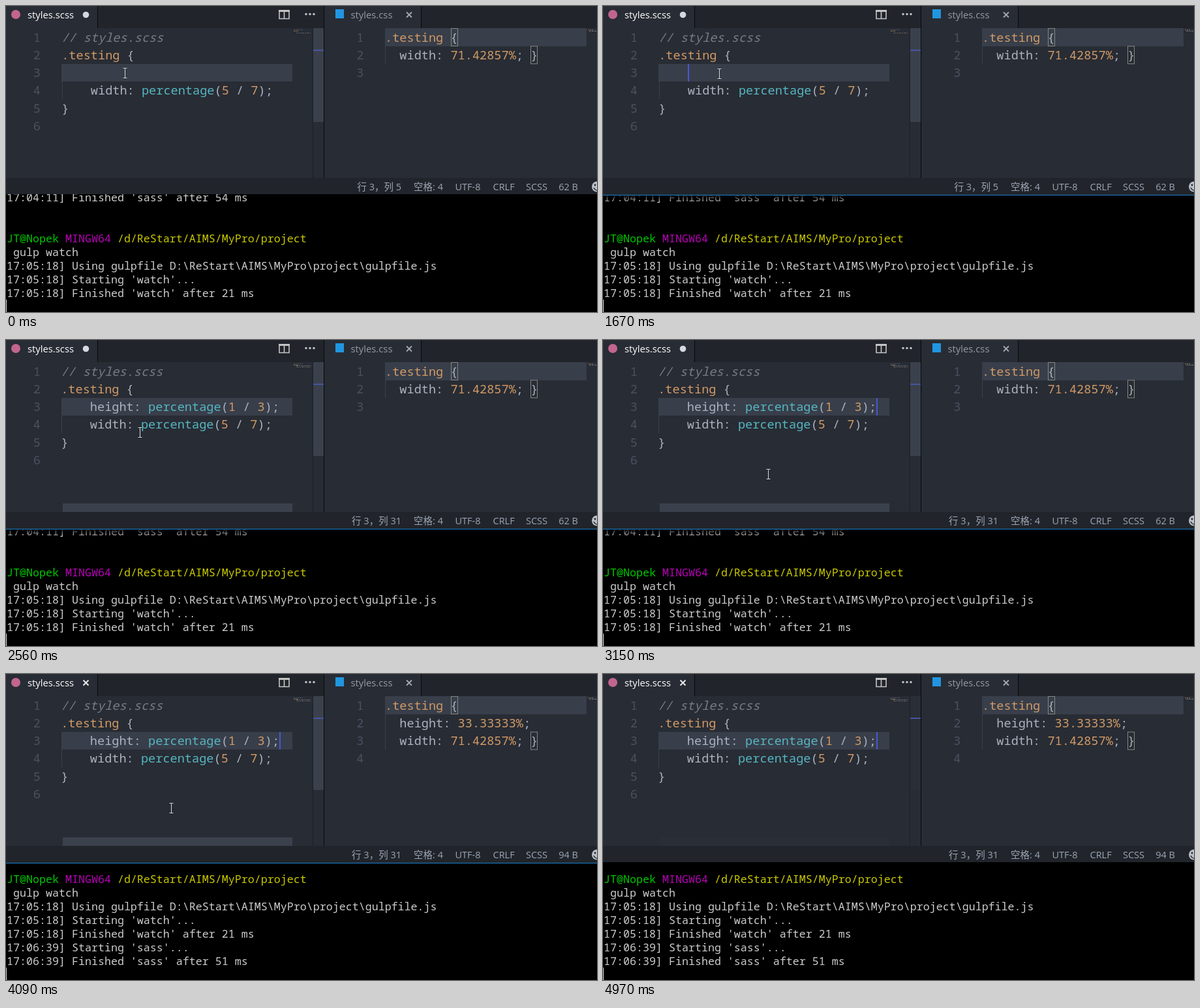
Write an HTML page that moves like this. It is 906 by 470 pixels and loops after 5070 ms.

```html
<!DOCTYPE html>
<html lang="en">
<head>
<meta charset="utf-8">
<title>SCSS watch</title>
<style>
html, body { margin: 0; width: 100%; height: 100%; overflow: hidden; background: #000; }
svg { display: block; width: 906px; height: 470px; }
text { white-space: pre; }
.code { font: 18.6px "Noto Sans Mono", monospace; }
.term { font: 16.67px "Noto Sans Mono", monospace; }
.ui { font: 14.8px "Open Sans", sans-serif; }
.status { font: 14.5px "Open Sans", "Noto Sans CJK SC", "Noto Sans CJK", sans-serif; }
</style>
</head>
<body>
<svg id="stage" viewBox="0 0 906 470"></svg>
<script>
const LOOP = 5070;
const stage = document.getElementById('stage');
const C = {
  bg: '#282c34', bar: '#21252b', edge: '#07080a', line: '#383e4a', gutter: '#495162',
  text: '#abb2bf', num: '#d19a66', fn: '#56b6c2', comment: '#757c88', status: '#9da5b4',
  caret: '#4757d2', slider: '#3b414c', guide: '#3b4048', term: '#cccccc'
};

function add(parent, tag, attrs = {}, content = '') {
  const el = document.createElementNS('http://www.w3.org/2000/svg', tag);
  for (const key in attrs) el.setAttribute(key, attrs[key]);
  el.textContent = content;
  parent.append(el);
  return el;
}
const group = (parent, attrs) => add(parent, 'g', attrs);
const rect = (parent, x, y, width, height, fill) => add(parent, 'rect', { x, y, width, height, fill });
const path = (parent, d, stroke, width = 1) =>
  add(parent, 'path', { d, stroke, fill: 'none', 'stroke-width': width });
const label = (parent, cls, x, y, fill, str, anchor = 'start') =>
  add(parent, 'text', { class: cls, x, y, fill, 'text-anchor': anchor }, str);

// parts alternate: colour, text, colour, text, ...
function rich(parent, cls, x, y, parts) {
  const el = add(parent, 'text', { class: cls, x, y });
  for (let i = 0; i < parts.length; i += 2) add(el, 'tspan', { fill: parts[i] }, parts[i + 1]);
  return el;
}
const rowY = n => 54.5 + 27.3 * (n - 1);
const codeRow = (parent, x, n, ...parts) => rich(parent, 'code', x, rowY(n), parts);
const lineNumber = (parent, x, n) => label(parent, 'code', x, rowY(n), C.gutter, n, 'end');
const show = (el, on) => el.setAttribute('display', on ? 'inline' : 'none');
const cross = (parent, x, color, width) =>
  path(parent, `M${x - 4} 9.5l8 8m0-8l-8 8`, color, width);

// Editor background and tabs
rect(stage, 0, 0, 906, 264, C.bg);
rect(stage, 141, 0, 346, 34, C.bar);
rect(stage, 637, 0, 269, 34, C.bar);
rect(stage, 140, 0, 1, 34, C.edge);
rect(stage, 636, 0, 1, 34, C.edge);

add(stage, 'circle', { cx: 15, cy: 13, r: 7, fill: '#c2658f' });
label(stage, 'ui', 33, 19, '#ffffff', 'styles.scss');
const dirtyDot = add(stage, 'circle', { cx: 122.5, cy: 13.5, r: 4.8, fill: '#d5d8dc' });
const closeMark = cross(stage, 122.5, '#e8e8e8', 2);
path(stage, 'M419 7.5h15v12h-15zM426.5 7v12', '#c5c5c5', 1.6);
rect(stage, 418, 6, 17, 3, '#c5c5c5');
for (const x of [460, 466, 472]) add(stage, 'circle', { cx: x, cy: 12.5, r: 1.7, fill: '#c5c5c5' });
rect(stage, 505, 5, 13, 14, '#2196e0');
label(stage, 'ui', 528.5, 19, '#959ba5', 'styles.css');
cross(stage, 618, '#a4a8ae', 1.8);

// Left pane
for (let n = 1; n <= 6; n++) lineNumber(stage, 53, n);
rect(stage, 85, 89, 354, 27, C.line);
const left = group(stage);
const codeX = 85.2;
rect(left, 86, 89, 1, 54, C.guide);
add(codeRow(left, codeX, 1), 'tspan', { fill: C.comment, 'font-style': 'italic' }, '// styles.scss');
codeRow(left, codeX, 2, C.num, '.testing', C.text, ' {');
const ratio = (n, prop, a, b) => codeRow(left, codeX, n,
  C.text, `    ${prop}: `, C.fn, 'percentage', C.text, '(', C.num, a, C.text, ' / ', C.num, b, C.text, ');');
const heightRow = ratio(3, 'height', 1, 3);
ratio(4, 'width', 5, 7);
codeRow(left, codeX, 5, C.text, '}');
const caret = rect(stage, 130, 89, 2, 27, C.caret);

// Minimap and scrollbars
function minimap(x, wide) {
  const g = group(stage, { opacity: .6 });
  path(g, `M${x} 36.5h${wide ? 14 : 9}`, wide ? '#6b727e' : C.num).setAttribute('stroke-dasharray', '2 1');
  if (!wide) return path(g, `M${x + 2} 38.5h13`, C.text).setAttribute('stroke-dasharray', '3 1');
  path(g, `M${x} 38.5h8`, C.num).setAttribute('stroke-dasharray', '3 1');
  path(g, `M${x + 4} 41.5h22`, '#8d7d70').setAttribute('stroke-dasharray', '4 1 2 1');
}
minimap(441, true);
const miniHeight = path(stage, 'M444 39.5h24', '#71808a');
miniHeight.setAttribute('stroke-dasharray', '4 1 2 1');
miniHeight.setAttribute('opacity', .7);
minimap(892, false);
rect(stage, 470, 34, 1, 230, '#1c1f25');
const vSlider = rect(stage, 471, 34, 16, 144, C.slider);
const hSlider = rect(stage, 87, 251, 352, 13, C.slider);
rect(stage, 471, 67, 16, 2, '#45559f');
rect(stage, 487, 0, 1, 264, C.edge);

// Right pane
rect(stage, 581, 34, 309, 28, C.line);
const bracket = (parent, x, n) => add(parent, 'rect', {
  x, y: rowY(n) - 20, width: 10, height: 27, fill: 'none', stroke: '#85897f'
});
bracket(stage, 682.5, 1);
codeRow(stage, 581, 1, C.num, '.testing', C.text, ' {');
lineNumber(stage, 548.5, 1);
function compiled(rules) {
  const g = group(stage);
  rect(g, 581, 62, 1, 27 * rules.length, C.guide);
  rules.forEach(([prop, value], i) => {
    const last = i === rules.length - 1;
    codeRow(g, 581, i + 2, C.text, `  ${prop}: `, C.num, value, C.text, last ? '; }' : ';');
    lineNumber(g, 548.5, i + 2);
  });
  lineNumber(g, 548.5, rules.length + 2);
  bracket(g, 804.5, rules.length + 1);
  return g;
}
const widthRule = ['width', '71.42857%'];
const cssBefore = compiled([widthRule]);
const cssAfter = compiled([['height', '33.33333%'], widthRule]);

// Terminal
const TOP = 289;
rect(stage, 0, TOP, 906, 470 - TOP, '#000');
const prompt = ['#00c800', ' JT@Nopek ', '#b800b8', 'MINGW64 ', '#c8c800', '/d/ReStart/AIMS/MyPro/project'];
const plain = str => [C.term, str];
const session = [
  prompt,
  plain('$ gulp watch'),
  plain('[17:05:18] Using gulpfile D:\\ReStart\\AIMS\\MyPro\\project\\gulpfile.js'),
  plain("[17:05:18] Starting 'watch'..."),
  plain("[17:05:18] Finished 'watch' after 21 ms")
];
function terminal(rows) {
  const g = group(stage);
  rows.forEach((parts, i) => rich(g, 'term', -9, 447 - 21 * (rows.length - 1 - i), parts));
  return g;
}
const termBefore = terminal([plain("[17:04:11] Finished 'sass' after 54 ms"), [], [], ...session]);
const termAfter = terminal([...session,
  plain("[17:06:39] Starting 'sass'..."),
  plain("[17:06:39] Finished 'sass' after 51 ms")]);
rect(stage, 0, 451, 1, 19, '#d8d8d8');

// Status bar, covering the top of the scrolled terminal text
rect(stage, 0, 264, 906, TOP - 264, C.bar);
const status = (x, str, anchor) => label(stage, 'status', x, 283, C.status, str, anchor);
const position = status(606, '', 'end');
status(625, '空格: 4');
status(688.5, 'UTF-8');
status(746.5, 'CRLF');
status(797, 'SCSS');
const size = status(877, '', 'end');
add(stage, 'circle', { cx: 906, cy: 277.5, r: 8, fill: '#b9bec8' });
add(stage, 'circle', { cx: 903, cy: 275, r: 1.4, fill: C.bar });
path(stage, 'M901 279q2 4 5 4', C.bar, 1.4);

// Border and shadow of the focused editor window
const shade = add(stage, 'linearGradient', { id: 'shade', x1: 0, y1: 0, x2: 0, y2: 1 });
add(shade, 'stop', { offset: 0, 'stop-opacity': .85 });
add(shade, 'stop', { offset: 1, 'stop-opacity': 0 });
const focusFrame = group(stage);
rect(focusFrame, 0, 291, 906, 11, 'url(#shade)');
rect(focusFrame, 0, TOP, 906, 1, C.bar);
rect(focusFrame, 0, 290, 906, 1, '#1a80cf');

const pointer = group(stage);
const beam = 'M-3 -7.5h2.5l.5 .5l.5 -.5h2.5M0 -7v14M-3 7.5h2.5l.5 -.5l.5 .5h2.5';
path(pointer, beam, '#15181c', 2.4).setAttribute('opacity', .5);
path(pointer, beam, '#dadada', 1.1);

// [time, x, y] of the mouse; it jumps from sample to sample
const mouse = [
  [0, 182.5, 103], [150, 178.5, 104], [2560, 205.5, 142], [2680, 251.5, 205], [3150, 253.5, 206],
  [4210, 480.5, 180], [4330, 728.5, 110], [4460, 350.5, 453], [4580, 118.5, 150],
  [4700, 100.5, 152], [4820, 93.5, 155]
];
// The caret flips at each of these times, starting hidden
const blinks = [680, 1080, 1670, 2560, 2990, 3540, 4090, 4580, 4970];

function sliderFade(t) {
  const start = 4210, steps = Math.floor((t - start) / 122) + 1;
  return t < start ? 1 : Math.max(.15, 1 - .3 * steps);
}

function render(t) {
  const typed = t >= 2070, saved = t >= 3420, built = t >= 3540;
  const focused = t >= 680 && t < 4970;

  left.setAttribute('transform', `translate(${typed ? -1 : 0} 0)`);
  show(heightRow, typed);
  show(miniHeight, typed);
  show(caret, blinks.filter(time => time <= t).length % 2);
  caret.setAttribute('x', typed ? 419 : 130);
  position.textContent = `行 3，列 ${typed ? 31 : 5}`;

  const fade = sliderFade(t);
  vSlider.setAttribute('opacity', fade);
  hSlider.setAttribute('opacity', !typed ? 0 : t < 2190 ? .3 : fade);

  show(dirtyDot, !saved);
  show(closeMark, saved);
  size.textContent = saved ? '94 B' : '62 B';
  show(termBefore, !saved);
  show(termAfter, saved);
  show(cssBefore, !built);
  show(cssAfter, built);
  show(focusFrame, focused);

  const [, x, y] = mouse.filter(([time]) => time <= t).pop();
  pointer.setAttribute('transform', `translate(${x} ${y})`);
  show(pointer, t < 4970);
}

const start = performance.now();
function tick() {
  render((performance.now() - start) % LOOP);
  requestAnimationFrame(tick);
}
tick();
</script>
</body>
</html>
```
